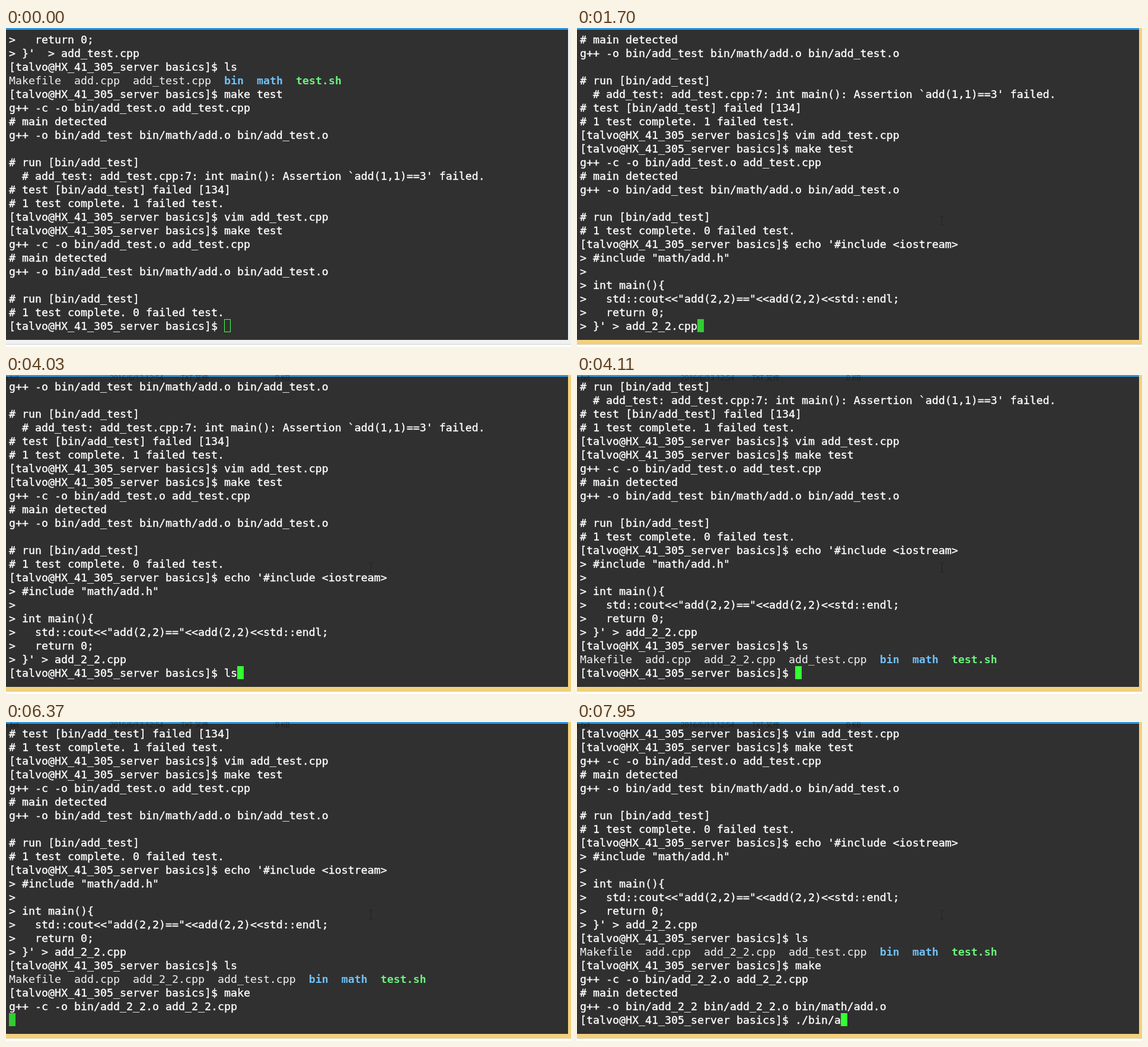
Animation of 953 by 538 pixels, one loop 8000 ms. Source, as an HTML page:

```html
<!DOCTYPE html>
<html lang="en">
<head>
<meta charset="utf-8">
<title>Terminal session</title>
<style>
  html, body { margin: 0; width: 100%; height: 100%; overflow: hidden; background: #fff; }
  #stage { position: relative; width: 953px; height: 538px; overflow: hidden; background: #fff; }
  #stage > * { position: absolute; }
  #frame { left: 0; top: 0; width: 953px; height: 533px; background: #f0f0f0; border-bottom: 1px solid #cfcfcf; }
  .focused #frame { background: #f3d17b; border-bottom-color: #d9c9a0; }
  #term { left: 0; top: 0; width: 948px; height: 526px; background: #303030; }
  #bar { left: 0; top: 0; width: 948px; height: 3px; background: #2e98df; }
  #ghost { left: 0; top: 0; width: 948px; height: 11px; overflow: hidden; color: rgba(0, 0, 0, .4);
    font: 12px/12px "Open Sans", "Noto Sans CJK SC", "Noto Sans CJK", sans-serif; }
  #ghost span { position: absolute; top: -1px; white-space: pre; }
  #text { left: 5px; top: 8px; margin: 0; color: #fff; -webkit-text-stroke: .35px #fff;
    font: 18.27px/23px "DejaVu Sans Mono", monospace; font-variant-ligatures: none; }
  #text .list { color: #f2f2f2; -webkit-text-stroke: 0; }
  #text b { color: #6fc1f7; }
  #text b.exe { color: #6cf27c; }
  #caret { top: 491px; width: 11px; height: 22px; box-sizing: border-box; }
  .hollow { border: 1px solid #4dff4d; }
  .bright { background: #33ff33; }
  .dim { background: #33cc33; }
  #beam { width: 7px; height: 16px; }
</style>
</head>
<body>
<div id="stage">
  <div id="frame"></div>
  <div id="term"></div>
  <div id="bar"></div>
  <div id="ghost"></div>
  <pre id="text"></pre>
  <div id="caret"></div>
  <svg id="beam" viewBox="0 0 7 16"><path d="M0 .5H3M4 .5H7M3.5 1V15M0 15.5H3M4 15.5H7" fill="none" stroke="#232323"/></svg>
</div>
<script>
const LOOP = 8000, ROWS = 22, CELL = 11, LEFT = 5;
const P = "[talvo@HX_41_305_server basics]$ ";
const log = `>   return 0;
> }'  > add_test.cpp
${P}ls
Makefile  add.cpp  add_test.cpp  bin  math  test.sh
${P}make test
g++ -c -o bin/add_test.o add_test.cpp
# main detected
g++ -o bin/add_test bin/math/add.o bin/add_test.o

# run [bin/add_test]
  # add_test: add_test.cpp:7: int main(): Assertion \`add(1,1)==3' failed.
# test [bin/add_test] failed [134]
# 1 test complete. 1 failed test.
${P}vim add_test.cpp
${P}make test
g++ -c -o bin/add_test.o add_test.cpp
# main detected
g++ -o bin/add_test bin/math/add.o bin/add_test.o

# run [bin/add_test]
# 1 test complete. 0 failed test.
${P}echo '#include <iostream>
> #include "math/add.h"
>
> int main(){
>   std::cout<<"add(2,2)=="<<add(2,2)<<std::endl;
>   return 0;
> }' > add_2_2.cpp
${P}ls
Makefile  add.cpp  add_2_2.cpp  add_test.cpp  bin  math  test.sh
${P}make
g++ -c -o bin/add_2_2.o add_2_2.cpp
# main detected
g++ -o bin/add_2_2 bin/add_2_2.o bin/math/add.o`.split("\n");

// time, finished lines, line being edited, caret style
const edits = [
  [0, 21, P, "hollow"],
  [580, 21, P, "bright"],
  [1700, 27, "> }' > add_2_2.cpp", "dim"],
  [2760, 28, P, "bright"],
  [3810, 28, P + "l", "bright"],
  [4030, 28, P + "ls", "bright"],
  [4110, 30, P, "bright"],
  [5890, 30, P + "m", "bright"],
  [5980, 30, P + "ma", "bright"],
  [6080, 30, P + "mak", "bright"],
  [6170, 30, P + "make", "bright"],
  [6370, 32, "", "dim"],
  [6620, 34, P, "bright"],
  [7230, 34, P + ".", "bright"],
  [7290, 34, P + "./", "bright"],
  [7460, 34, P + "./b", "bright"],
  [7560, 34, P + "./bin", "bright"],
  [7660, 34, P + "./bin/", "bright"],
  [7950, 34, P + "./bin/a", "bright"]
];
// faint window text showing through the top edge: x, text
const ghosts = [
  [0, []],
  [2270, [[175, "2016/6/13 13:47"], [295, "GIF 图像"], [454, "0 KB"]]],
  [3240, [[-3, "a.txt"], [175, "2016/6/13 12:54"], [295, "TXT 文件"], [454, "0 KB"]]]
];
const beams = [[0, null], [70, [828, 499]], [250, null], [580, [612, 317]]];

const $ = id => document.getElementById(id);
const at = (steps, t) => steps.findLast(s => s[0] <= t);
const escape = s => s.replace(/&/g, "&amp;").replace(/</g, "&lt;");
const list = s => '<span class="list">' + s.replace(/\b(bin|math)\b/g, "<b>$1</b>")
  .replace("test.sh", '<b class="exe">test.sh</b>') + "</span>";
const paint = s => s.startsWith("Makefile") ? list(s) : escape(s);

function drawEdit([, count, line, style]) {
  const rows = [...log.slice(count - ROWS + 1, count), line];
  $("text").innerHTML = rows.map(paint).join("\n");
  $("caret").className = style;
  $("caret").style.left = LEFT + CELL * line.length + "px";
  $("stage").className = style === "hollow" ? "" : "focused";
}

function drawGhost([, parts]) {
  $("ghost").innerHTML = parts.map(([x, s]) => `<span style="left:${x}px">${s}</span>`).join("");
}

function drawBeam([, pos]) {
  const style = $("beam").style;
  style.display = pos ? "block" : "none";
  if (pos) [style.left, style.top] = pos.map(v => v + "px");
}

const tracks = [[edits, drawEdit], [ghosts, drawGhost], [beams, drawBeam]];
const shown = [];
const start = performance.now();

function tick() {
  const t = (performance.now() - start) % LOOP;
  tracks.forEach(([steps, draw], i) => {
    const step = at(steps, t);
    if (step !== shown[i]) draw(shown[i] = step);
  });
  requestAnimationFrame(tick);
}
tick();
</script>
</body>
</html>
```
